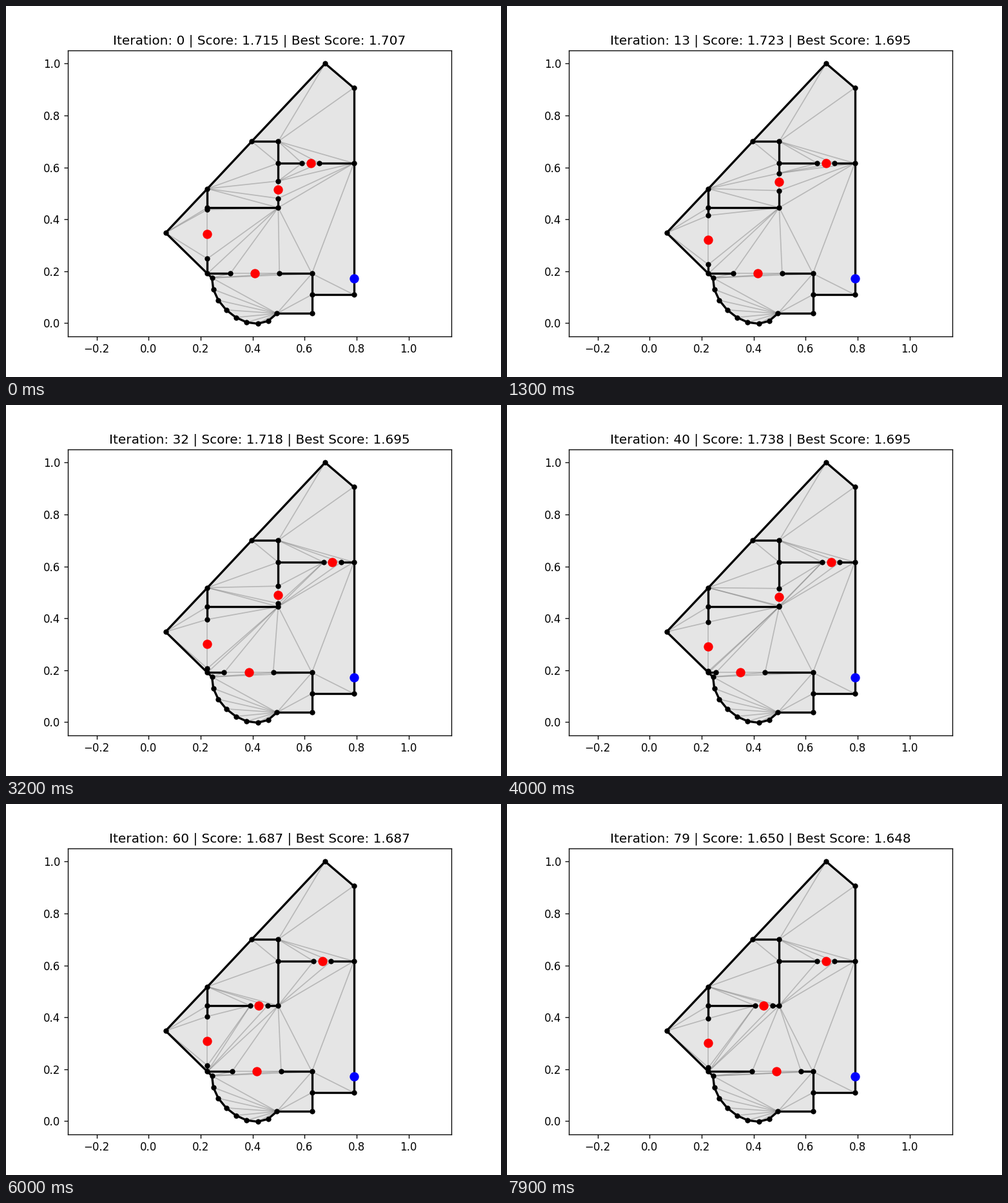
A matplotlib script that plays this animation: 768x576 px, repeating every 8 s.

```python
import numpy as np
import matplotlib.pyplot as plt
from matplotlib.animation import FuncAnimation
from matplotlib.collections import LineCollection

FRAMES, STEP_MS = 80, 100
DOOR, WIDE_DOOR = 0.0668, 0.189
SWITCH = 56          # iteration at which the middle door changes wall
STEPS = np.arange(FRAMES)

# Walls share a few grid lines
X1, X2, X3, X4 = 0.226, 0.4985, 0.628, 0.7892
Y0, Y1, Y2, Y3, Y4, Y5 = 0.0375, 0.110, 0.191, 0.445, 0.616, 0.700

A, B, C = (0.679, 1.0), (X4, 0.906), (X4, Y4)
E, F, G, H = (X4, Y1), (X3, Y1), (X3, Y0), (0.4935, Y0)
I, J, K, L = (X1, Y2), (0.0652, 0.348), (X1, 0.518), (0.3965, Y5)
M, N, O, P, Q = (X2, Y5), (X2, Y4), (X2, Y3), (X1, Y3), (X3, Y2)
S = (0.2435, 0.1745)
ENTRANCE = (X4, 0.172)


def bezier(p0, p1, p2, p3, n):
    t = np.linspace(0, 1, n)[:, None]
    p0, p1, p2, p3 = map(np.array, (p0, p1, p2, p3))
    pts = (p0 * (1 - t)**3 + 3 * p1 * t * (1 - t)**2
           + 3 * p2 * t**2 * (1 - t) + p3 * t**3)
    return [tuple(p) for p in pts]


BAY = bezier(H, (0.4138, -0.0672), (0.2357, 0.0556), S, 9)
OUTLINE = [A, B, C, E, F, G, *BAY, I, J, K, L]
CORNERS = OUTLINE + [M, N, O, P, Q]

rng = np.random.default_rng(5)


def walk(sd, *keys):
    """Random walk pinned to (iteration, value) keys."""
    at, values = zip(*keys)
    noise = np.cumsum(rng.normal(0, sd, FRAMES))
    noise -= np.interp(STEPS, at, noise[list(at)])
    return np.interp(STEPS, at, values) + noise


def slide(low, high, width, *keys):
    """Door centre wandering along a wall without leaving it."""
    return np.clip(walk(0.002, *keys), low + width / 2, high - width / 2)


right = slide(X2, X4, DOOR, (0, 0.6237), (24, 0.7147), (40, 0.6977),
              (51, 0.6532), (79, 0.6785))
upright = slide(Y3, Y4, DOOR, (0, 0.514), (13, 0.544), (24, 0.496),
                (40, 0.4815), (51, 0.4948))
level = slide(X1, X2, DOOR, (60, 0.424), (79, 0.439))
left = slide(Y2, Y3, WIDE_DOOR, (0, 0.343), (40, 0.291), (51, 0.3335),
             (60, 0.309), (79, 0.301))
bottom = slide(X1, X3, WIDE_DOOR, (0, 0.4085), (24, 0.428), (40, 0.3495),
               (79, 0.4885))

score = walk(0.003, (0, 1.715), (6, 1.695), (13, 1.723), (24, 1.699),
             (40, 1.738), (51, 1.726), (60, 1.687), (77, 1.648), (79, 1.650))
score = np.maximum(score, np.where(STEPS < 60, 1.695, 1.648))
best = np.minimum(1.707, np.minimum.accumulate(score))


def across(x, y, width):
    return (x - width / 2, y), (x + width / 2, y)


def down(x, y, width):
    return (x, y + width / 2), (x, y - width / 2)


def fan(hub, *points):
    return [(hub, p) for p in points]


def layout(i):
    """Mesh edges, inner walls, door ends and door centres."""
    a1, a2 = across(right[i], Y4, DOOR)
    l1, l2 = down(X1, left[i], WIDE_DOOR)
    b1, b2 = across(bottom[i], Y2, WIDE_DOOR)
    centres = [(right[i], Y4), (X1, left[i]), (bottom[i], Y2)]

    mesh = fan(M, A, B, C, a2, a1) + fan(J, P, l1, l2) + fan(Q, C, E, O)
    mesh += fan(H, F, Q, *BAY[2:]) + fan(S, b1, b2, Q)
    mesh += fan(N, L) + fan(K, N, O) + fan(O, b2, b1, I)
    walls = [(L, M), (M, N), (N, a1), (a2, C), (K, P), (P, l1), (l2, I),
             (I, b1), (b2, Q), (Q, F)]

    if i < SWITCH:
        m1, m2 = down(X2, upright[i], DOOR)
        centres.append((X2, upright[i]))
        walls += [(N, m1), (m2, O), (P, O)]
        mesh += fan(O, l1, l2)
        if b2[0] > X2:
            mesh += fan(m1, a1, a2, C) + fan(C, m2, O)
        else:
            mesh += fan(a1, m1, m2, O) + fan(O, a2, C)
    else:
        m1, m2 = across(level[i], Y3, DOOR)
        centres.append((level[i], Y3))
        walls += [(P, m1), (m2, O), (N, O)]
        mesh += fan(O, a1, a2, C) + fan(m1, l1, l2, I) + fan(m2, I)
    mesh += fan(K, m1, m2)
    doors = [(a1, a2), (l1, l2), (b1, b2), (m1, m2)]
    return mesh + doors, walls, [p for d in doors for p in d], centres


fig, ax = plt.subplots(figsize=(6.4, 4.8), dpi=120)
ax.set_xlim(-0.3109, 1.1653)
ax.set_ylim(-0.05, 1.05)

ax.fill(*zip(*OUTLINE), color="#e5e5e5", lw=0, zorder=1)
mesh_lines = LineCollection([], colors="gray", alpha=0.45, linewidths=1, zorder=2)
wall_lines = LineCollection([], colors="black", linewidths=2, zorder=3)
ax.add_collection(mesh_lines)
ax.add_collection(wall_lines)
outer_walls = list(zip(OUTLINE, OUTLINE[1:] + OUTLINE[:1]))
dots, = ax.plot([], [], "o", color="black", ms=4, zorder=4)
ax.plot(*ENTRANCE, "o", color="blue", ms=7.6, zorder=5)
marks, = ax.plot([], [], "o", color="red", ms=7.6, zorder=5)
title = ax.set_title("")


def update(i):
    mesh, walls, ends, centres = layout(i)
    mesh_lines.set_segments(mesh)
    wall_lines.set_segments(outer_walls + walls)
    dots.set_data(*zip(*CORNERS, *ends))
    marks.set_data(*zip(*centres))
    title.set_text(f"Iteration: {i} | Score: {score[i]:.3f}"
                   f" | Best Score: {best[i]:.3f}")
    return mesh_lines, wall_lines, dots, marks, title


anim = FuncAnimation(fig, update, frames=FRAMES, interval=STEP_MS,
                     repeat=True, repeat_delay=0, blit=False)
plt.show()
```
